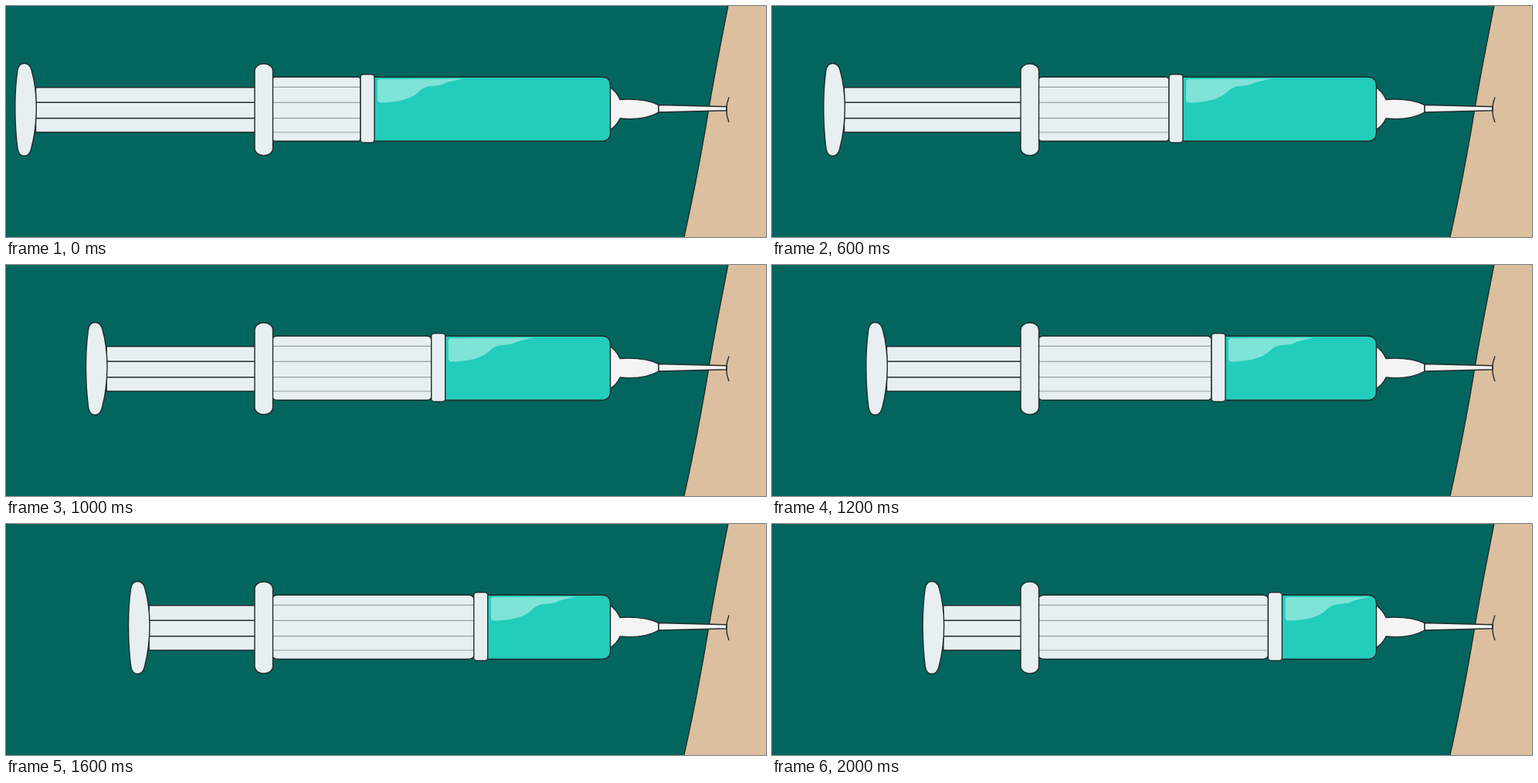
Write an HTML page that moves like this. It is 984 px wide and 300 px high and loops after 2100 ms.

```html
<!DOCTYPE html>
<html lang="en">
<head>
<meta charset="utf-8">
<title>Syringe</title>
<style>
  html, body { margin: 0; width: 100%; height: 100%; overflow: hidden; background: #02665e; }
  svg { display: block; width: 984px; height: 300px; }
  .ink { stroke: #222b2c; stroke-width: 1.4; }
  .pale { fill: #e8eff3; }
  .tip { fill: #f4f4f4; }
  .rib { stroke: #98a0a3; stroke-width: 1.2; }
</style>
</head>
<body>
<svg viewBox="0 0 984 300" fill="none">
  <path class="ink" fill="#dcbf9f" d="M935 -1C928 36 918 84 910 133C902 182 890 246 877.5 302H990V-1Z"/>

  <!-- nozzle and needle -->
  <path class="ink tip" d="M782 105.5Q791 112 795 121.5Q826 119.500 845 128.500V138Q826 149 795 146Q791 155 782 161Z"/>
  <path class="ink tip" d="M845 128.500L933 130.700V135.700L845 138Z"/>
  <path class="ink" d="M936 118.500Q929.500 135 936 151"/>

  <!-- barrel -->
  <path class="ink" fill="#23cdbb" d="M470 92.300H771Q782.500 92.300 782.500 104V164Q782.500 175.500 771 175.500H470Z" id="liquid"/>
  <rect class="ink pale" id="air" x="345" y="92.300" height="83.200" ry="4.500"/>
  <path class="rib" id="ribs"/>

  <!-- plunger -->
  <path class="ink pale" id="rod"/>
  <g id="plunger">
    <path class="ink pale" d="M23.500 74.500C28.500 74.500 31.500 78 33 83C37 97 39.300 115 39.300 132C39.300 152 36.500 171 32.500 186C31 192 28 194.700 23.500 194.700C19 194.700 16 191 15 185C13 170 11.800 150 11.800 131C11.800 112 13 97 15 83C16 78 19 74.500 23.500 74.500Z"/>
    <path fill="#7fe3d8" d="M481 98.500Q481 95 485 95L592 94.600C579 97 572 98.500 567 101C559 105 549 102 540 107C534 111 533 114 525 118C514 123.500 499 125.500 486 125.500Q481 125.500 481 121Z"/>
    <rect class="ink pale" x="459" y="88.800" width="18" height="88.700" rx="4"/>
  </g>
  <rect class="ink pale" x="322" y="75" width="23.500" height="119.300" rx="11.500" ry="9"/>
</svg>
<script>
  const STEP = 100, STEPS = 21, STRIDE = 9.17;
  const part = id => document.getElementById(id);
  const rules = (from, to, ys) => ys.map(y => `M${from} ${y}H${to}`).join('');
  const start = performance.now();

  function draw(now) {
    const step = Math.floor(Math.max(0, now - start) / STEP) % STEPS;
    const shift = step * STRIDE;
    const head = 459 + shift;

    part('plunger').setAttribute('transform', `translate(${shift})`);
    part('rod').setAttribute('d',
      `M${38.5 + shift} 105.800H323V164H${38.5 + shift}Z` + rules(38.5 + shift, 323, [125.3, 145.7]));
    part('air').setAttribute('width', head - 345);
    part('air').setAttribute('rx', (head - 345) * 0.026);
    part('ribs').setAttribute('d', rules(346, head, [105.3, 125.3, 145.7, 164]));
    part('liquid').setAttribute('d',
      `M${head + 9} 92.300H771Q782.500 92.300 782.500 104V164Q782.500 175.500 771 175.500H${head + 9}Z`);
    requestAnimationFrame(draw);
  }
  draw(start);
</script>
</body>
</html>
```
